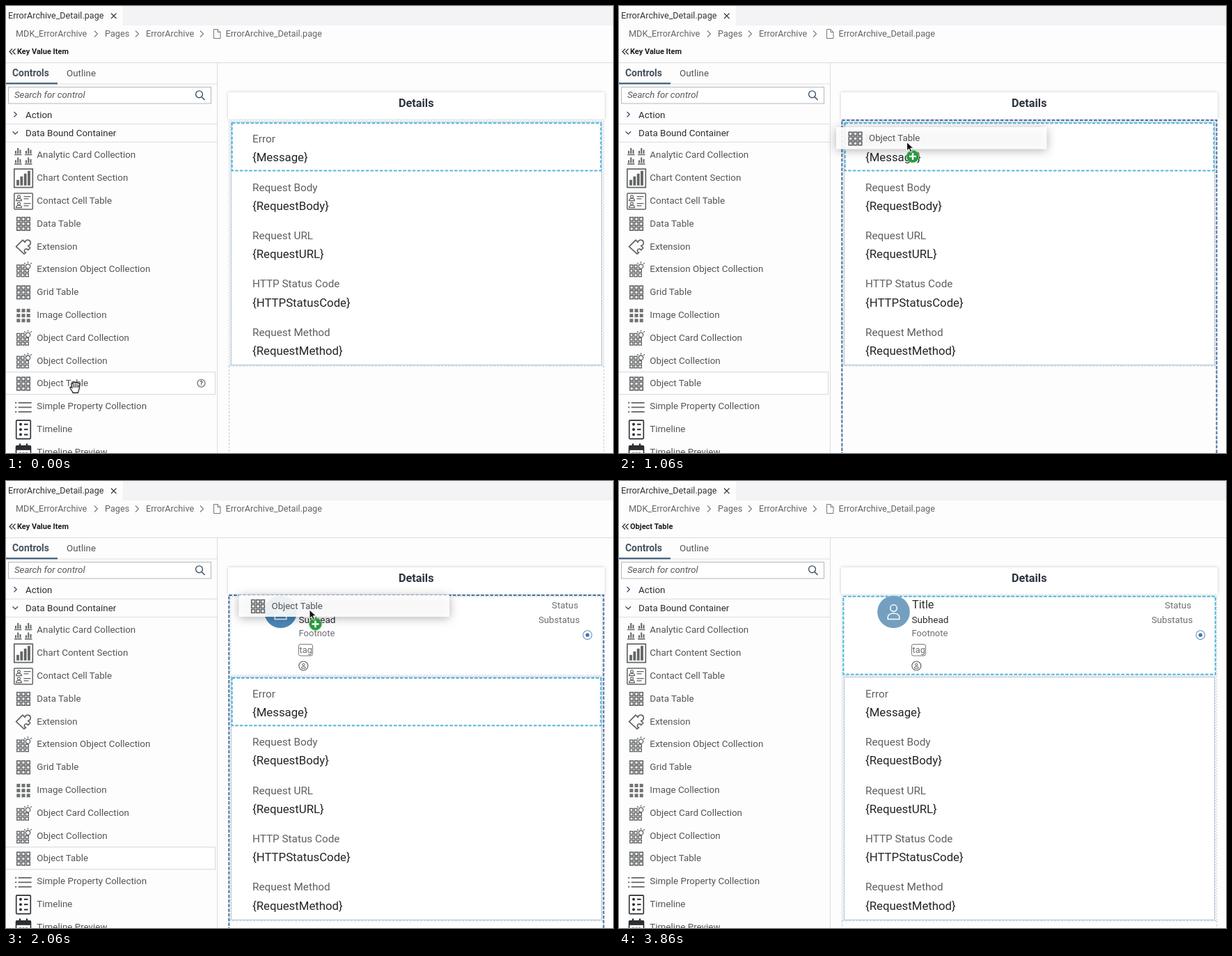
These frames come from a looping animation (872x642 px, 4260 ms). An HTML page:

```html
<!DOCTYPE html>
<html lang="en">
<head>
<meta charset="utf-8">
<title>Drag a control onto a page</title>
<style>
html, body { margin: 0; width: 100%; height: 100%; overflow: hidden; background: #fdfdfd; }
svg { display: block; font-family: Roboto, "Open Sans", sans-serif; }
text { white-space: pre; }
</style>
</head>
<body>
<svg id="stage" width="872" height="642" viewBox="0 0 872 642"></svg>
<script>
const LOOP = 4260;
const INK = '#2b2e32', GREY = '#525558', ICON = '#626466', SKY = '#52b8dc', NAVY = '#4d70a0';
const stage = document.getElementById('stage');

// Each step holds until the next: start time, dragged card x, y
const DRAG = [
  [30, -2, 524], [60, 25, 500], [260, 234, 287], [460, 272, 225], [660, 292, 189],
  [860, 296, 184], [1060, 312, 174], [1260, 318, 170], [1460, 320, 165.5],
  [1660, 326, 165], [1860, 330, 164], [2060, 334.5, 163.5], [2260, 335, 163.5]
];
const TIMES = [0, ...DRAG.map(d => d[0]), 2460, 2660, 2860, 3060, 3260, 3460, 3860];

const rect = (x, y, w, h, fill = 'none', stroke = 'none', more = '') =>
  `<rect x="${x}" y="${y}" width="${w}" height="${h}" fill="${fill}" stroke="${stroke}" ${more}/>`;
const path = (d, stroke = ICON, width = 1.4, fill = 'none', more = '') =>
  `<path d="${d}" stroke="${stroke}" stroke-width="${width}" fill="${fill}" ${more}/>`;
const circle = (x, y, r, fill = 'none', stroke = 'none', width = 1.2) =>
  `<circle cx="${x}" cy="${y}" r="${r}" fill="${fill}" stroke="${stroke}" stroke-width="${width}"/>`;
const text = (x, y, s, size = 13.4, fill = INK, more = '') =>
  `<text x="${x}" y="${y}" font-size="${size}" fill="${fill}" ${more}>${s}</text>`;
const at = (x, y, body, more = '') => `<g transform="translate(${x} ${y})" ${more}>${body}</g>`;
const repeat = (n, f) => Array.from({ length: n }, (_, i) => f(i)).join('');
const dashed = (x, y, w, h, color) => rect(x, y, w, h, 'none', color, 'stroke-width="2" stroke-dasharray="4.5 2.2"');

// Icons are centred on 0,0
const grid = () => repeat(9, i =>
  rect(-9.3 + i % 3 * 6.9, -9.3 + (i / 3 | 0) * 6.9, 4.8, 4.8, 'none', ICON, 'stroke-width="1.6"'));
const icons = {
  grid,
  blocks: () => repeat(9, i => rect(-9.7 + i % 3 * 7.2, -9.2 + (i / 3 | 0) * 7.2, 5, 5, '#707274')),
  bulbGrid: () => repeat(8, i => {
    const cell = i < 2 ? i : i + 1;
    return rect(-9.3 + cell % 3 * 6.2, -6.5 + (cell / 3 | 0) * 6.2, 4.2, 4.2, 'none', ICON, 'stroke-width="1.4"');
  }) + circle(6.5, -4.5, 3.2, '#fdfdfd', ICON, 1.3) +
    path('M5 -.2h3M6.5 -9.3v-2.2M2.8 -8l-1.6 -1.6M10.2 -8l1.6 -1.6', ICON, 1.3),
  charts: () => repeat(4, i => at(-13 + i % 2 * 15, -11 + (i >> 1) * 13.5,
    path('M0 10h10.5', ICON, 1.5) + path('M2 8.5v-4M5.2 8.5v-8M8.5 8.5v-5.5', ICON, 2))),
  chart: () => rect(-13.2, -13.2, 26.5, 26.5, 'none', ICON, 'stroke-width="1.7"') +
    path('M-8 10.5v-8M-2.7 10.5v-13M2.7 10.5v-17M8 10.5v-21', ICON, 3.8),
  contact: () => rect(-13.2, -11, 26.5, 23, 'none', ICON, 'stroke-width="1.5" rx="1"') +
    repeat(2, i => at(-6.5, -5 + i * 10, circle(0, -1.3, 2, 'none', ICON) +
      path('M-4 4.5c0 -4.5 8 -4.5 8 0z', ICON, 1.2) + path('M7 -1.5h10M7 1.8h7', ICON, 1.4))),
  puzzle: () => path('M-10.5 0L-1 -9.5l3.2 3.2c.6 -5 8.6 -4.4 8 1.4c-.4 2.6 -2 3.4 -3.6 3.5l3.2 3.2 -3.2 3.2c-1 -3.4 -6.4 -1.8 -5 2c.5 1.2 1.4 1.6 2 1.5l-2.6 2z',
    ICON, 1.7, 'none', 'stroke-linejoin="round"'),
  list: () => repeat(3, i => path(`M-12 ${-5.5 + i * 6.5}h2.2m2.5 0h19`, ICON, 1.8)),
  timeline: () => rect(-10.3, -13, 20.6, 26.5, 'none', INK, 'stroke-width="1.6" rx="1"') +
    repeat(3, i => circle(-4, -7.3 + i * 7.4, 2, INK) + path(`M1 ${-7.3 + i * 7.4}h5.5`, INK, 2)),
  calendar: () => rect(-10.5, -9, 21, 22, 'none', INK, 'stroke-width="1.6" rx="1"') +
    rect(-10.5, -9, 21, 6, INK) + path('M-5 -12.5v5M5 -12.5v5', INK, 2.4) +
    path('M-6 2h3M-1.5 2h3M3 2h3', INK, 3)
};
const CONTROLS = [
  ['Analytic Card Collection', 'charts'], ['Chart Content Section', 'chart'],
  ['Contact Cell Table', 'contact'], ['Data Table', 'grid'], ['Extension', 'puzzle'],
  ['Extension Object Collection', 'bulbGrid'], ['Grid Table', 'grid'], ['Image Collection', 'blocks'],
  ['Object Card Collection', 'bulbGrid'], ['Object Collection', 'bulbGrid'], ['Object Table', 'grid'],
  ['Simple Property Collection', 'list'], ['Timeline', 'timeline'], ['Timeline Preview', 'calendar']
];
const FIELDS = [
  ['Error', 'Message'], ['Request Body', 'RequestBody'], ['Request URL', 'RequestURL'],
  ['HTTP Status Code', 'HTTPStatusCode'], ['Request Method', 'RequestMethod']
];

const arrow = (x, y) => at(x, y,
  path('M0 0v12.5l3 -2.8 2.2 4.8 2.3 -1 -2.2 -4.7h4.2z', '#fff', 1, '#111'));
const hand = (x, y) => at(x, y, path(
  'M-3 7.5c0 -2.5 -4.5 -5.5 -4 -7.5c.6 -1.5 2.4 -.4 3 .8l-1.2 -5.8c-.2 -1.8 2 -2 2.4 -.4l.3 -1.4c.2 -1.7 2.5 -1.6 2.7 0c.4 -1.4 2.5 -1.2 2.6 .4c.6 -1.1 2.4 -.8 2.5 .6c.6 -.6 2 0 1.8 1.6c-.5 5 -1 8 -2.6 11.7z',
  '#222', 1.3, '#fff', 'stroke-linejoin="round"') +
  path('M-2.6 -5l.8 5M.2 -6l.2 6M2.9 -5l-.2 5M5.2 -4l-.4 4', '#222', 1.1));

function topBar(t) {
  const chevron = x => path(`M${x - 2} 35.5l4.5 4.5 -4.5 4.5`, '#777', 1.1);
  const unsaved = t >= 2460 && t < 3860;
  const crumb = (x, s) => text(x, 44, s, 12.7, '#646464');
  return rect(168, 0, 704, 28, '#f3f3f5') +
    text(3, 18.3, 'ErrorArchive_Detail.page', 12.6, '#333') +
    (unsaved ? circle(154.5, 14, 4, '#333') : path('M151 10.5l7.5 7.5m0 -7.5l-7.5 7.5', '#333', 1.1)) +
    crumb(14, 'MDK_ErrorArchive') + crumb(142, 'Pages') + crumb(201, 'ErrorArchive') +
    crumb(315.5, 'ErrorArchive_Detail.page') + [129, 188, 281].map(chevron).join('') +
    path('M298.5 33.5h5.5l4 4v9h-9.5zM304 33.5v4h4', '#777', 1) +
    path('M9 61.5l-4 4 4 4M13.5 61.5l-4 4 4 4', '#222', 1.1) +
    text(16, 69.3, t < 3060 ? 'Key Value Item' : 'Object Table', 11, '#1d1d1d', 'font-weight="700"') +
    path('M0 81.5h872M303.5 82v560', '#dcdcde', 1);
}

function sidebar(t) {
  const hovered = t < 2460 ? 10 : t < 3060 ? -1 : t < 3260 ? 9 : t < 3460 ? 13 : -1;
  const help = t < 30 || t >= 3060;
  const rowY = i => 213.7 + i * 32.8;
  let out = text(9, 101, 'Controls', 13.9, '#46525e', 'font-weight="700"') + text(87, 101, 'Outline', 13.4, GREY) +
    path('M0 112h303M0 169.5h303M0 195.5h303', '#dedee0', 1) + rect(0, 110, 74, 2.4, '#4a6a86') +
    rect(3.5, 116.5, 291, 23.5, '#fff', '#b4b7ba') +
    text(12, 132.2, 'Search for control', 13.2, '#55585b', 'font-style="italic"') +
    circle(277.5, 126.8, 4.9, 'none', '#3d5268', 1.4) + path('M281 130.5l4.5 4.5', '#3d5268', 1.6) +
    path('M11.5 152l3.7 3.7 -3.7 3.7M9.5 180.2l3.8 3.7 3.8 -3.7', '#3f5a75', 1.4) +
    text(28, 160.5, 'Action') + text(28, 186.6, 'Data Bound Container');
  if (hovered >= 0) {
    const y = rowY(hovered);
    out += rect(-1, y - 15.9, 301.5, 32, '#fff', '#d3d6e2');
    if (help) out += circle(280.5, y, 5.5, 'none', '#555', 1.1) +
      text(280.5, y + 3.1, '?', 8.5, '#444', 'text-anchor="middle" font-weight="700"');
  }
  return out + CONTROLS.map(([name, icon], i) =>
    at(25, rowY(i) + .8, icons[icon]()) + text(44.3, rowY(i) + 4.7, name, 13.4, GREY)).join('');
}

function objectTable(t) {
  const person = (s, color, w) => circle(0, -3.6 * s, 3.2 * s, 'none', color, w) +
    path(`M${-5.5 * s} ${7 * s}v${-2 * s}c0 ${-5 * s} ${11 * s} ${-5 * s} ${11 * s} 0v${2 * s}z`, color, w);
  return circle(394.5, 188, 23.3, t < 2460 ? '#4a88b9' : '#759fc0') + at(394.5, 188, person(1.5, '#fff', 1.5)) +
    text(421, 183.4, 'Title', 16.2) + text(420.5, 204, 'Subhead', 13.6) +
    text(420.5, 223.2, 'Footnote', 13, '#6c6f72') +
    rect(420.5, 234.5, 20, 16.5, 'none', '#77797c', 'rx="2.5"') + text(421.6, 247, 'tag', 12.8, '#6a6d70') +
    circle(427.3, 265.5, 6.5, 'none', '#55585b', 1.1) + at(427.3, 265.5, person(.5, '#55585b', 1)) +
    text(784, 182.5, 'Status', 13.3, '#6c6f72') + text(765, 204, 'Substatus', 13.2, '#6c6f72') +
    circle(835.3, 221.2, 6.4, 'none', '#6d92b8', 1.1) + circle(835.3, 221.2, 2.7, '#3f79b0');
}

function pagePreview(t) {
  const inserted = t >= 1660, dropping = t >= 260 && t < 2460;
  const shift = inserted ? 114.7 : 0, end = 517 + shift;
  let out = rect(319, 124, 541, 38.5, '#fff', 'none', 'style="filter:drop-shadow(0 0 2px #0003)"') +
    text(589.2, 145.2, 'Details', 16.3, '#2b3440', 'text-anchor="middle" font-weight="700"') +
    rect(319.5, 162.5, 540, end - 162.5, 'url(#hatch)') +
    rect(323.5, 167, 532, 111, '#fff') +
    path(`M320 ${end}h539M320.5 ${end}v200M858.8 ${end}v200`, '#b4cfe0', 1, 'none', 'stroke-dasharray="3 2"') +
    rect(323.5, 167 + shift, 532, 348.5, '#fff', '#bcc4d4') +
    FIELDS.map(([label, value], i) => at(354, 69.4 * i + shift,
      text(0, 196.2, label, 15.3, '#5c5f62') + text(0, 223.4, `{${value}}`, 16.8, '#222426'))).join('');
  if (inserted) out += objectTable(t);
  if (t < 2460) out += dashed(324.7, 168.2 + shift, 529.8, 68.3, SKY);
  if (dropping) out += dashed(320.3, 164, 538.2, 520, NAVY);
  if (t >= 2660) out += dashed(322.3, 165.8, 534.5, 112, SKY);
  return out;
}

function pointer(t) {
  if (t < 30) return hand(99, 548);
  if (t < 2460) {
    const [, x, y] = DRAG.filter(d => d[0] <= t).pop();
    return at(x, y,
      rect(0, 0, 302.5, 31.5, '#fff', 'none', 'fill-opacity=".9" style="filter:drop-shadow(0 2px 7px #0005)"') +
      at(27.5, 16.5, grid()) + text(47, 20, 'Object Table', 13.3, GREY) +
      circle(110, 42, 9, '#279a3c', '#8acb92', 1) + path('M105 42h10M110 37v10', '#fff', 2.4) +
      arrow(101.5, 21.5));
  }
  if (t < 2860) return arrow(436, 185);
  if (t < 3060) return arrow(330, 350);
  if (t < 3260) return hand(219, 601);
  return t < 3460 ? hand(228, 634) : '';
}

const HATCH = `<defs><pattern id="hatch" width="4" height="4" patternUnits="userSpaceOnUse">
  <rect width="4" height="4" fill="#f8fafb"/><path d="M-1 1L1 -1M0 4L4 0M3 5L5 3" stroke="#bfd0dc" stroke-width="1"/>
</pattern></defs>`;

let shown = -1;
function frame() {
  const now = performance.now() % LOOP;
  const t = TIMES.filter(s => s <= now).pop();
  if (t !== shown) {
    stage.innerHTML = HATCH + rect(0, 0, 872, 642, '#fdfdfd') + topBar(t) + sidebar(t) + pagePreview(t) + pointer(t);
    shown = t;
  }
  requestAnimationFrame(frame);
}
frame();
</script>
</body>
</html>
```
